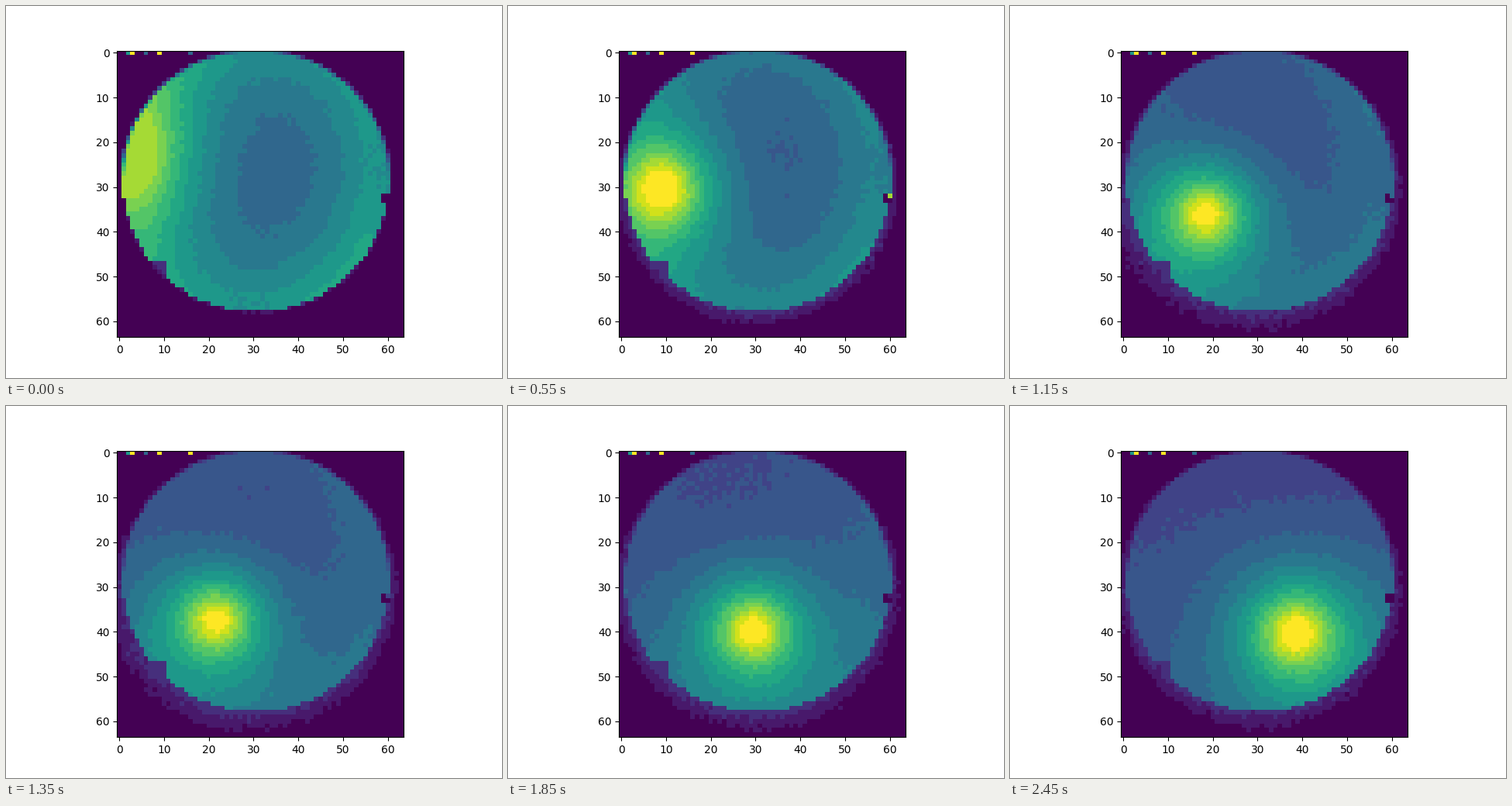
Recreate the animation shown at these times as a matplotlib script. Size 640 by 480 pixels, loop 2500 ms.

```python
import numpy as np
import matplotlib.pyplot as plt
from matplotlib.animation import FuncAnimation

SIZE, FRAMES, TOP = 64, 50, 15
Y, X = np.mgrid[0:SIZE, 0:SIZE].astype(float)

# The lens: slightly flattened disc, soft above and sharp below
CX, CY, RX, RY, RADIUS = 30.5, 28.7, 29.5, 28.9, 29.2
DIST = RADIUS * np.hypot((X - CX) / RX, (Y - CY) / RY)
NOTCH = ((X <= 10) & (Y >= 47)) | ((X <= 2) & (Y == 37))
PORT = (X >= 59) & (X <= 60) & (Y >= 32) & (Y <= 33)
COVER = np.where(Y < 31, np.clip(RADIUS + 1 - DIST, 0, 1), DIST < RADIUS + .2)
COVER[NOTCH] = 0

# Position on the disc, about -1 to 1 each way
P = np.clip((X - 31) / 20.5, -1.15, 1.15)
Q = np.clip((Y - 28) / 20, -1.3, 1.3)
GRAIN = np.random.default_rng(4).normal(0, .08, (SIZE, SIZE))


def spot_centre(i):
    """Steady drift to the right, sinking ever more slowly."""
    return .9 + .77 * i, 40.3 - 17 * (1 - i / 46) ** 2


def background(u):
    """A bowl that flattens into a slope as u goes from 0 to 1."""
    swing = np.cos(2 * np.pi * u)
    floor = 4.1 + .45 * swing + .3 * (1 - u)
    bowl = (1 - u) * (2.1 * P ** 2 + 1.6 * Q ** 2)
    return floor + bowl + .35 * P + (.2 + .7 * u) * Q + .3 * swing * P * Q


def spot(i, sx, sy):
    """Round glow, wider and weaker while it enters at the rim."""
    entry = np.exp(-i / 5)
    r = np.hypot((X - sx) / (1 + .4 * entry), (Y - sy) / (1 + .6 * entry))
    return 12.8 * (1 - .25 * entry) * np.exp(-(r / 10) ** 1.25)


def halo(i, sx, sy, rng):
    """Faint scattered light below the disc, stronger on the spot's side."""
    reach = .6 + 3.3 * (1 - np.exp(-i / 8))
    spill = 2.2 * np.sin(np.pi * i / FRAMES) ** 4
    dx, dy = sx - CX, sy - CY
    cos = ((X - CX) * dx + (Y - CY) * dy) / (np.hypot(dx, dy) * DIST + 1e-6)
    width = reach * (.55 + .45 * (Y - CY) / 30)
    width += spill * np.clip(cos, 0, 1) ** 4 * (Y > CY)
    width = np.clip(width, .05, None) * (1 + rng.normal(0, .1, X.shape))
    out = np.clip(DIST - RADIUS, 0, None)
    glow = 1 + 1.6 * (1 - out / width) + rng.normal(0, .2, X.shape)
    return np.where(out < width, glow, 0)


def add_glints(img, i, rng):
    """Bright speckles that flare up along the lower inner edge."""
    arc = 52.3 - .02 * (X - 29) ** 2
    density = .6 * np.exp(-((i - 42) / 2.5) ** 2)
    near = (abs(Y - arc) < 1.1) & (X > 19) & (X < 49)
    hit = near & (rng.random(X.shape) < density)
    img[hit] = rng.integers(11, 15, hit.sum())


def add_marks(img, i):
    """Status cells in the top row and the flash at the side port."""
    img[0, [2, 3, 6, 9]] = 8, 15, 5, 15
    img[0, 16] = 15 if 11 <= i < 28 else 5
    if i % 37 in range(3, 9):
        img[0, 12] = 7
    img[PORT] = 0
    img[32, 60] = np.floor(15 * i / 7 * np.exp(1 - i / 7))


def picture(i):
    rng = np.random.default_rng(100 + i)
    sx, sy = spot_centre(i)
    field = background(i / (FRAMES - 1)) + spot(i, sx, sy) + GRAIN
    field = np.minimum(field, 15.2 - 1.8 * np.exp(-i / 2)) * COVER
    img = np.floor(np.maximum(field, halo(i, sx, sy, rng)))
    add_glints(img, i, rng)
    add_marks(img, i)
    return np.clip(img, 0, TOP)


fig, ax = plt.subplots(figsize=(6.4, 4.8), dpi=100)
image = ax.imshow(picture(0), cmap="viridis", vmin=0, vmax=TOP)


def update(i):
    image.set_data(picture(i))
    return (image,)


anim = FuncAnimation(fig, update, frames=FRAMES, interval=50,
                     repeat=True, repeat_delay=0)
plt.show()
```
